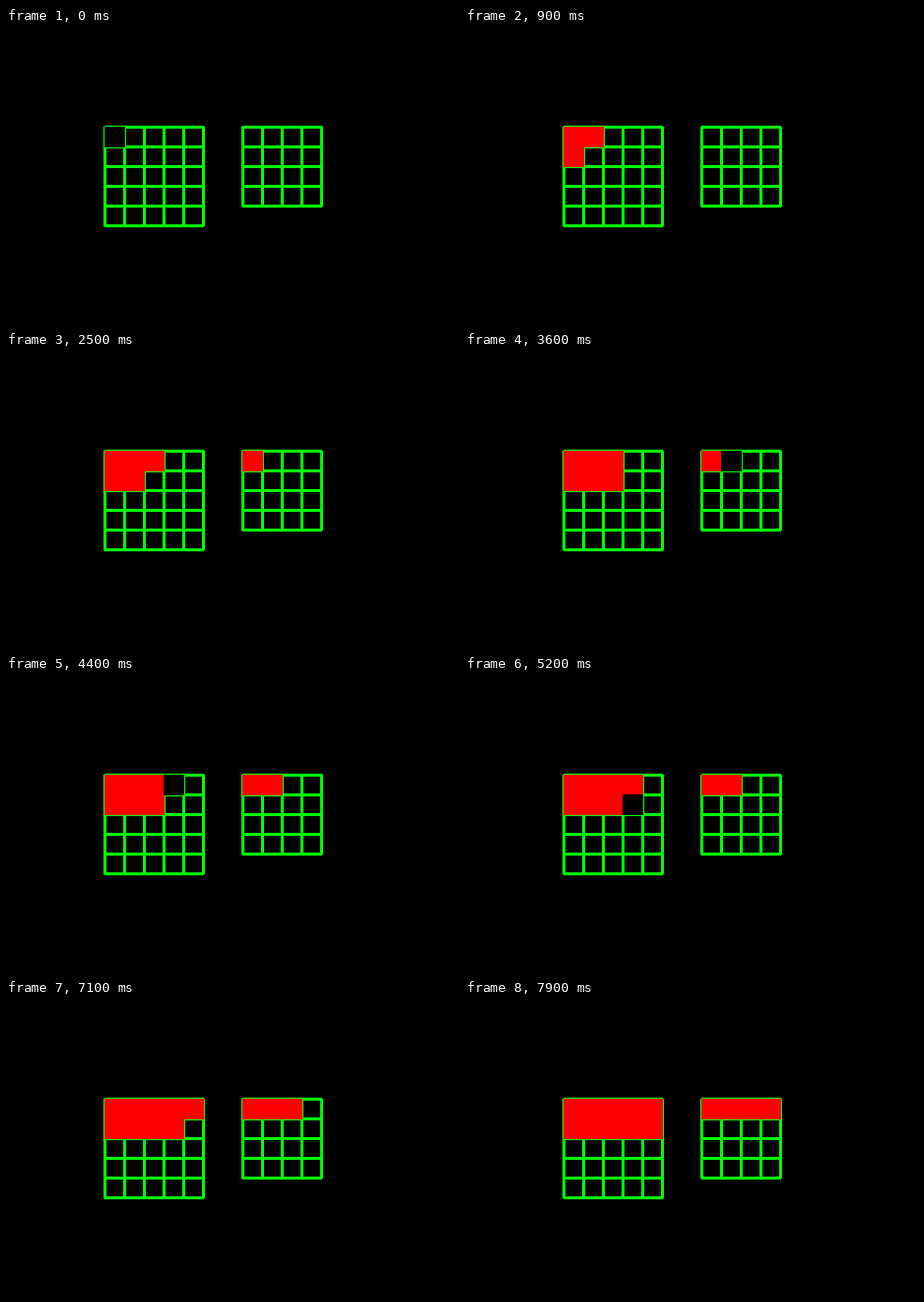
Animation, 460 px wide and 300 px high, one loop 8000 ms. Source, as an HTML page:

```html
<!DOCTYPE html>
<html lang="en">
<head>
<meta charset="utf-8">
<title>Sliding window over a grid</title>
<style>
  html, body { margin: 0; width: 100%; height: 100%; overflow: hidden; background: #000; }
  svg { display: block; }
</style>
</head>
<body>
<svg width="460" height="300" viewBox="0 0 460 300" shape-rendering="crispEdges">
  <rect width="460" height="300" fill="#000"/>
  <g id="grids" fill="none" stroke="#0f0" stroke-width="3"></g>
  <g id="cells"></g>
</svg>
<script>
const LOOP = 8000, STEP = 100, BLINKS = 4, CELL = 20, TOP = 100;
const INPUT = { x: 100, size: 5 };
const OUTPUT = { x: 240, size: 4 };
const WINDOWS = 4;

function add(parent, tag, attrs) {
  const node = document.createElementNS('http://www.w3.org/2000/svg', tag);
  for (const key in attrs) node.setAttribute(key, attrs[key]);
  return document.getElementById(parent).appendChild(node);
}

function drawGrid({ x, size }) {
  const length = size * CELL + 1;
  let d = '';
  for (let i = 0; i <= size; i++) {
    const offset = i * CELL + 0.5;
    d += `M${x} ${TOP + offset}h${length}M${x + offset} ${TOP}v${length}`;
  }
  add('grids', 'path', { d });
}

function makeVisit(grid, col, row) {
  return add('cells', 'rect', {
    x: grid.x + col * CELL, y: TOP + row * CELL,
    width: CELL + 1, height: CELL + 1
  });
}

[INPUT, OUTPUT].forEach(drawGrid);

// Each window visits its 2x2 input cells row by row, then its output cell.
const visits = [];
for (let w = 0; w < WINDOWS; w++) {
  for (let row = 0; row < 2; row++) {
    for (let col = 0; col < 2; col++) visits.push(makeVisit(INPUT, w + col, row));
  }
  visits.push(makeVisit(OUTPUT, w, 0));
}

function render(time) {
  const step = Math.floor((time % LOOP) / STEP);
  const current = Math.floor(step / BLINKS);
  visits.forEach((cell, i) => {
    const red = i < current || step % 2 === 1;
    cell.setAttribute('visibility', i <= current ? 'visible' : 'hidden');
    cell.setAttribute('fill', red ? '#f00' : '#000');
  });
}

const start = performance.now();
function tick() {
  render(performance.now() - start);
  requestAnimationFrame(tick);
}
tick();
</script>
</body>
</html>
```
